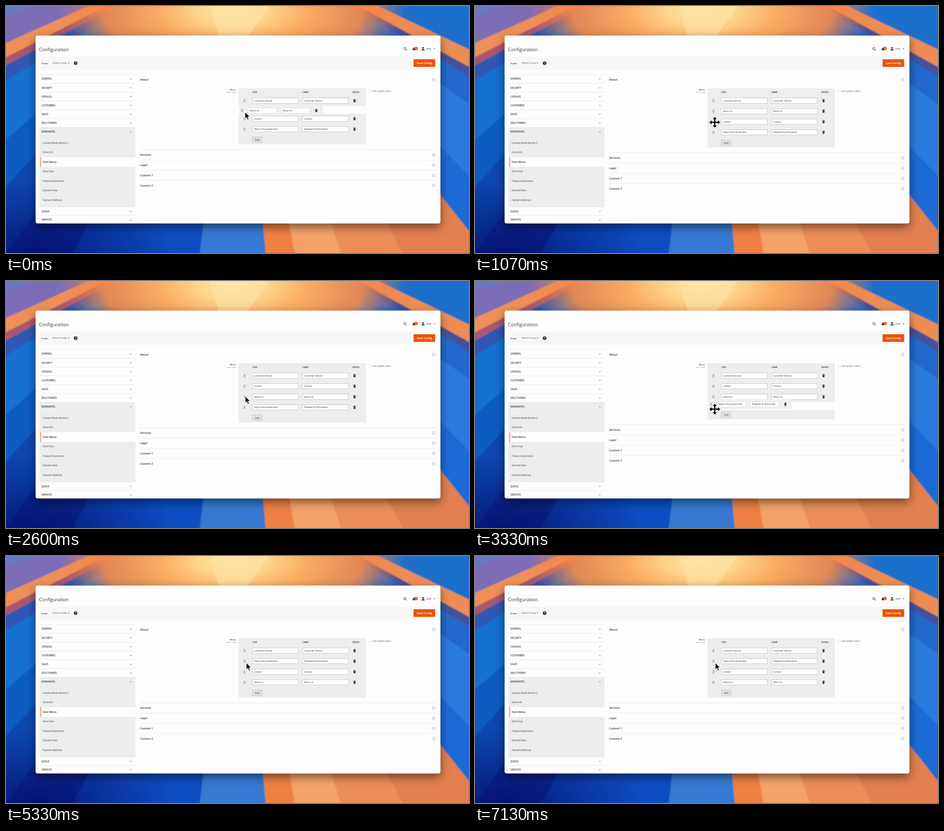
Animation, 898 px wide and 480 px high, one loop 7.19 s. Source, as an HTML page:

```html
<!DOCTYPE html>
<html lang="en">
<head>
<meta charset="utf-8">
<title>Menu configuration</title>
<style>
html, body { margin: 0; width: 100%; height: 100%; overflow: hidden; }
svg { display: block; width: 898px; height: 480px; font-family: "Open Sans", "Noto Sans", sans-serif; }
</style>
</head>
<body>
<svg viewBox="0 0 898 480">
  <defs>
    <radialGradient id="glow">
      <stop offset="0" stop-color="#ffe3a2"/>
      <stop offset=".2" stop-color="#fdd58c"/>
      <stop offset=".42" stop-color="#fbad64"/>
      <stop offset=".75" stop-color="#f58a48" stop-opacity=".9"/>
      <stop offset="1" stop-color="#f08048" stop-opacity="0"/>
    </radialGradient>
    <radialGradient id="night">
      <stop offset="0" stop-color="#020c68" stop-opacity=".85"/>
      <stop offset="1" stop-color="#020c68" stop-opacity="0"/>
    </radialGradient>
    <filter id="soft"><feGaussianBlur stdDeviation="1.2"/></filter>
    <filter id="shadow" x="-10%" y="-15%" width="120%" height="135%">
      <feDropShadow dx="0" dy="7" stdDeviation="9" flood-opacity=".5"/>
    </filter>
  </defs>
  <g id="wallpaper"></g>
  <rect x="57.5" y="57.5" width="785" height="365" rx="4" fill="#fdfdfd" filter="url(#shadow)"/>
  <g id="page"></g>
  <g id="live"></g>
</svg>
<script>
const LOOP = 7190, PITCH = 20.5, FIRST = 184, SHRINK = 6;
const el = id => document.getElementById(id);

const rect = (x, y, w, h, fill, extra = '') =>
  `<rect x="${x}" y="${y}" width="${w}" height="${h}" fill="${fill}" ${extra}/>`;
const path = (d, stroke, width = .7, fill = 'none') =>
  `<path d="${d}" fill="${fill}" stroke="${stroke}" stroke-width="${width}"/>`;
const circle = (x, y, r, fill, extra = '') =>
  `<circle cx="${x}" cy="${y}" r="${r}" fill="${fill}" ${extra}/>`;
const text = (x, y, size, str, { w = 400, fill = '#444', anchor = 'start' } = {}) =>
  `<text x="${x}" y="${y + size * .36}" font-size="${size}" font-weight="${w}" fill="${fill}" text-anchor="${anchor}">${str}</text>`;
const bold = { w: 600, fill: '#333' };
const chevron = (x, y, up) =>
  path(`M${x - 1.7} ${y + (up ? .8 : -.8)}l1.7 ${up ? -1.7 : 1.7} 1.7 ${up ? 1.7 : -1.7}`, '#555', .8);

// Rays fan out from above the stage; each entry is a ray's end point and the colour after it.
function wallpaper() {
  const rays = [
    [0, -40, '#6a78c4'], [0, 20, '#7d6db6'], [0, 72, '#ee9058'], [0, 100, '#a8586c'],
    [0, 116, '#2f58b4'], [0, 145, '#1670cf'], [0, 260, '#0d5cc2'], [0, 350, '#0a46b0'],
    [0, 480, '#08309c'], [130, 480, '#0a4ec2'], [376, 480, '#3579d2'], [504, 480, '#ee8143'],
    [560, 480, '#f5a268'], [650, 480, '#ec8e58'], [770, 480, '#e2804f'], [898, 437, '#1f6ad6'],
    [898, 330, '#2a7ade'], [898, 190, '#2468cc'], [898, 136, '#44519c'],
    [898, 118, '#ee8d52'], [898, 84, '#1a70cc'], [898, -40]
  ];
  const cx = 450, cy = -130;
  const far = ([x, y]) => `${cx + (x - cx) * 1.1} ${cy + (y - cy) * 1.1}`;
  let out = rect(0, 0, 898, 480, '#1a6acc') + '<g filter="url(#soft)">';
  for (let i = 0; i < rays.length - 1; i++) {
    out += path(`M${cx} ${cy}L${far(rays[i])}L${far(rays[i + 1])}z`, rays[i][2], .6, rays[i][2]);
  }
  return out + '</g>' +
    '<ellipse cx="60" cy="490" rx="270" ry="150" fill="url(#night)"/>' +
    '<ellipse cx="440" cy="10" rx="335" ry="140" fill="url(#glow)"/>' +
    path('M395 0L412 57H470L510 0z', 'none', 0, '#ffe6aa88');
}

function page() {
  let out = text(64, 84.5, 9.05, 'Configuration', { fill: '#41362f' });
  out += circle(773.5, 82.6, 2.2, 'none', 'stroke="#444" stroke-width=".9"') + path('M775 84.3l2 2', '#444', 1.1);
  out += path('M788.5 86l1-4q2-3 4 0l1 4z', 'none', 0, '#41362f') + circle(795.5, 82.5, 3.3, '#e2642c') +
    text(795.5, 82.5, 3.6, '1', { fill: '#fff', anchor: 'middle' });
  out += circle(809, 81.5, 1.8, '#41362f') + path('M805.8 86.3q0-2.6 3.2-2.6t3.2 2.6z', 'none', 0, '#41362f');
  out += text(815, 83, 4.4, 'clerk') + path('M829.5 82.2h3l-1.5 1.8z', 'none', 0, '#444');

  out += rect(64.5, 98, 771, 26, '#f7f7f7');
  out += text(69, 111, 4.2, 'Scope:', bold) + text(90.5, 111, 4, 'Default Config') +
    path('M119.5 110.2h3l-1.5 1.8z', 'none', 0, '#444');
  out += circle(135, 111, 3.6, '#41362f') + text(135, 111, 4.5, '?', { w: 700, fill: '#fff', anchor: 'middle' });
  out += rect(790.5, 103.5, 41.8, 14.8, '#eb5202') +
    text(811.5, 111, 5.3, 'Save Config', { w: 600, fill: '#fff', anchor: 'middle' });

  out += rect(64.5, 236, 186.5, 154.5, '#ededed');
  const sections = ['GENERAL', 'SECURITY', 'CATALOG', 'CUSTOMERS', 'SALES', 'ZELK THEMES', 'MORVANTEL'];
  const heading = (name, y, up) =>
    path(`M64.5 ${y - 8.6}H251`, '#dcdcdc', .6) + text(69, y, 4.5, name, bold) + chevron(242, y, up);
  sections.forEach((name, i) => out += heading(name, 141.8 + i * 17.13, i == 6));
  out += heading('QUELD', 399) + heading('SERVICES', 415.7);

  out += rect(66, 294, 185, 18.5, '#fdfdfd') + rect(66.4, 294, 2, 18.5, '#f0a070');
  ['Consent Mode Version 2', 'Store Info', 'Store Menus', 'Store Usps', 'Product Attachment', 'Dynamic Rear', 'Payment Methods']
    .forEach((name, i) => out += text(71, 266 + i * 18.5, 4.45, name, i == 2 ? bold : {}));

  out += text(260, 142.8, 5.6, 'About', bold) + toggle(143, true);
  out += text(446, 162.5, 4.3, 'Menu', { w: 600, anchor: 'end' }) +
    text(446, 167.5, 3.3, '[store view]', { fill: '#888', anchor: 'end' });
  out += rect(704.5, 163, 4.5, 4.5, '#fff', 'stroke="#ccc" stroke-width=".6"') +
    text(711, 165, 4.4, 'Use system value', { fill: '#666' });
  return out;
}

function toggle(y, up) {
  return circle(829.5, y, 2.8, 'none', 'stroke="#999" stroke-width=".6"') +
    path(`M828.2 ${y + (up ? .5 : -.5)}l1.3 ${up ? -1 : 1} 1.3 ${up ? 1 : -1}`, '#777', .6);
}

const entries = [
  ['customer-service', 'Customer Service'],
  ['about-us', 'About us'],
  ['contact', 'Contact'],
  ['https://morvantel.dev/', 'Powered by Morvantel']
];

function field(x, y, w, str, border) {
  return rect(x, y - 5.2, w, 10.4, '#fff', `stroke="${border}" stroke-width=".7"`) + text(x + 3, y, 4.4, str);
}

function row(id, y, held) {
  const [grip, link, label, bin, w, border] = held
    ? [458, 469.5, 533.5, 602, 56, '#d4d4d4']
    : [462.5, 478, 575, 676, 89, '#b9b9b9'];
  let out = held ? rect(453, y - 9.5, 161.5, 19, '#efefef') : '';
  for (let k = 0; k < 6; k++) out += rect(grip - 1.5 + k % 2 * 2, y - 2.6 + (k >> 1) * 2, 1.1, 1.3, '#777');
  out += field(link, y, w, entries[id][0], border) + field(label, y, w, entries[id][1], border);
  return out + rect(bin - 2.4, y - 2.6, 4.8, 1.1, '#333') + rect(bin - .9, y - 3.3, 1.8, 1, '#333') +
    path(`M${bin - 2} ${y - 1.1}h4l-.4 4.1h-3.2z`, 'none', 0, '#41362f');
}

// Pointer stops: time, x, y
const stops = [
  [0, 463.5, 206], [480, 463.5, 206], [850, 465, 226], [1250, 465, 226], [1700, 465, 207],
  [2150, 465, 207], [2500, 464, 224], [2850, 464, 224], [3150, 465, 249], [3420, 465, 249],
  [4050, 466, 207.5], [LOOP, 466, 207.5]
];
const drags = [
  { id: 1, from: -1, to: 400 },
  { id: 2, from: 1250, to: 1950 },
  { id: 3, from: 3220, to: 4500 }
];
const overGrip = [[750, 1450], [2950, 3600]];

function pointer(t) {
  const i = Math.max(1, stops.findIndex(s => s[0] >= t));
  const [a, b] = [stops[i - 1], stops[i]];
  const u = (t - a[0]) / (b[0] - a[0]), e = u * u * (3 - 2 * u);
  return [a[1] + (b[1] - a[1]) * e, a[2] + (b[2] - a[2]) * e];
}

function cursor(t) {
  const [x, y] = pointer(t);
  let shape;
  if (overGrip.some(([a, b]) => t >= a && t < b)) {
    const arm = 'M-1.3-1.3V-6H-4L0-10.5 4-6H1.3V-1.3z';
    const arms = [0, 90, 180, 270].map(r => `<path d="${arm}" transform="rotate(${r})"/>`).join('');
    shape = path('M0-12.5L12.5 0 0 12.5-12.5 0z', '#bbb', .7, '#fff') +
      `<g fill="#000">${arms}</g>` + rect(-1.4, -1.4, 2.8, 2.8, '#000');
  } else {
    shape = path('M0 0V13.2L3 10.4 5.2 15.3 7.6 14.3 5.4 9.5H9.6z', '#fff', 1, '#000');
  }
  return `<g transform="translate(${x} ${y})">${shape}</g>`;
}

function live(t) {
  let order = [0, 1, 2, 3], held = null, gap = 9;
  for (const { id, from, to } of drags) {
    if (t < from) break;
    const y = Math.min(pointer(Math.max(0, Math.min(t, to)))[1] - 2.8, 239.5);
    const slot = Math.round((y - FIRST) / PITCH);
    order = order.filter(k => k != id);
    order.splice(slot, 0, id);
    if (t < to) { held = { id, y }; gap = slot; }
  }
  const dy = held ? -SHRINK : 0;
  let out = rect(451, 160, 247, 115 + dy, '#ededed');
  out += text(478, 167, 4.4, 'Link', bold) + text(575, 167, 4.4, 'Label', bold) + text(672, 167, 4.4, 'Action', bold);
  if (held) out += rect(451, FIRST - 10.2 + gap * PITCH, 247, PITCH - SHRINK + .8, '#fdfdfd');
  order.forEach((id, i) => {
    if (i != gap) out += row(id, FIRST + i * PITCH - (i > gap ? SHRINK : 0));
  });
  out += rect(478, 260.5 + dy, 18.5, 10.5, '#e3e3e3', 'stroke="#b8b8b8" stroke-width=".7"') +
    text(487.2, 265.8 + dy, 4.8, 'Add', { anchor: 'middle' });

  ['Services', 'Legal', 'Custom 1', 'Custom 2'].forEach((name, i) => {
    const y = 295.4 + i * 19.8 + dy;
    out += path(`M260 ${y - 9.9}H835`, '#ddd', .6) + text(260, y, 5.5, name, bold) + toggle(y);
  });
  if (held) out += row(held.id, held.y, true);
  return out + cursor(t);
}

el('wallpaper').innerHTML = wallpaper();
el('page').innerHTML = page();
const start = performance.now();
function draw() {
  el('live').innerHTML = live((performance.now() - start) % LOOP);
  requestAnimationFrame(draw);
}
draw();
</script>
</body>
</html>
```
